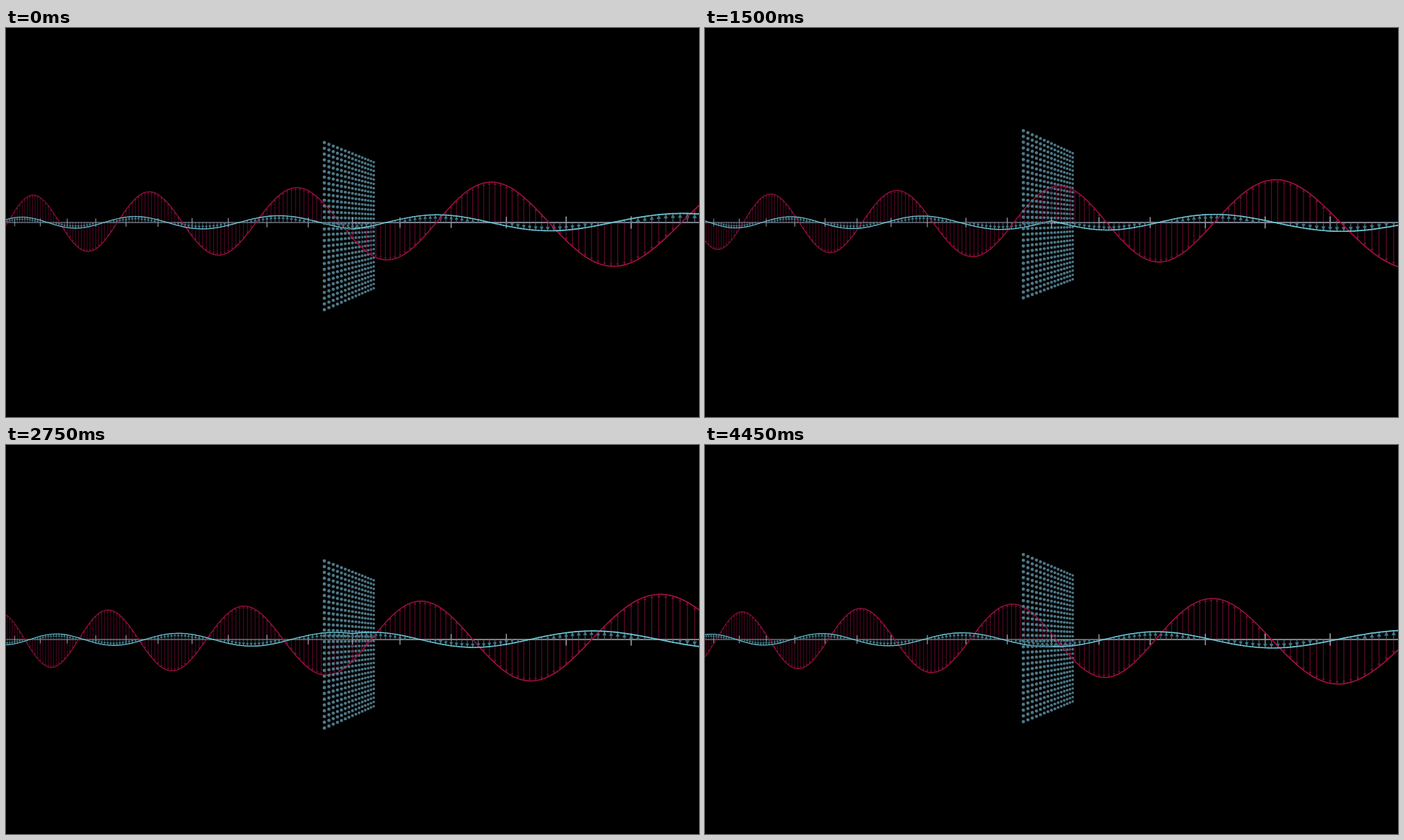
Recreate the animation shown at these times as an HTML page with a canvas. Size 960 by 540 pixels, loop 4500 ms.

```html
<!DOCTYPE html>
<html lang="en">
<head>
<meta charset="utf-8">
<title>Wave through an oscillating sheet</title>
<style>
html, body { margin: 0; width: 100%; height: 100%; overflow: hidden; background: #000; }
canvas { display: block; }
</style>
</head>
<body>
<canvas id="stage" width="960" height="540"></canvas>
<script>
const ctx = document.getElementById('stage').getContext('2d');
const LOOP = 4500, STEP = 50;
const CX = 480, CY = 270;
const FIRST = -11, LAST = 6.4;           // visible part of the axis, in units

const scaleAt = n => 1 / (1 - 0.0356 * n);
const xAt = n => CX + 63.46 * n * scaleAt(n);
const wave = u => Math.cos(u * Math.PI / 2);  // wavelength of 4 units

function line(x1, y1, x2, y2, width) {
  ctx.lineWidth = width;
  ctx.beginPath();
  ctx.moveTo(x1, y1);
  ctx.lineTo(x2, y2);
  ctx.stroke();
}

function arrows(height, color, from, to, head) {
  ctx.strokeStyle = ctx.fillStyle = color;
  for (let k = Math.round(from * 10); k < to * 10; k++) {
    const n = k / 10, s = scaleAt(n), x = xAt(n);
    const h = height(n) * s;
    const len = Math.min(Math.abs(h), head * 2 * s) * Math.sign(h);
    const half = Math.abs(len) / 2;
    line(x, CY, x, CY - h + len, 0.9 * s);
    ctx.beginPath();
    ctx.moveTo(x, CY - h);
    ctx.lineTo(x - half, CY - h + len);
    ctx.lineTo(x + half, CY - h + len);
    ctx.fill();
  }
}

function curve(height, color, from, to, width) {
  ctx.strokeStyle = color;
  const y = n => CY - height(n) * scaleAt(n), d = 0.05;
  for (let k = Math.round(from / d); k < to / d; k++) {
    const n = k * d;
    line(xAt(n), y(n), xAt(n + d), y(n + d), width * scaleAt(n));
  }
}

function axis(from, to) {
  ctx.strokeStyle = '#a9a9b8';
  for (let n = from; n < to; n++) {
    const s = scaleAt(n), x = xAt(n);
    line(x, CY, xAt(n + 1), CY, 1.25 * s);
    line(x, CY - 6.6 * s, x, CY + 6.6 * s, 1.2 * s);
  }
}

function sheet(shift) {
  for (let col = 7; col >= -7; col--) {
    const s = 1 / (1 + 0.02 * col), x = CX + 4.79 * col * s;
    for (let row = 0; row < 30; row++) {
      const y = CY + ((row - 14.5) * 6.88 - shift) * s;
      ctx.fillStyle = '#48707f';
      ctx.beginPath();
      ctx.arc(x, y, 2.05 * s, 0, 7);
      ctx.fill();
      ctx.fillStyle = '#5f8997';
      ctx.beginPath();
      ctx.arc(x - 0.4 * s, y - 0.4 * s, 0.8 * s, 0, 7);
      ctx.fill();
    }
  }
}

function draw(ms) {
  const t = ms / 1000;
  // the motion starts slightly ahead and settles to an even speed
  const crest = 2.653 + t + 0.067 * Math.max(0, 1 - t / 0.6);
  const red = n => 50.6 * wave(n - crest);
  const blue = n => 10 * wave(Math.abs(n) - crest + 1);
  const half = (from, to) => {
    arrows(red, '#6c0c31', from, to, 1.7);
    axis(from, Math.ceil(to));
    arrows(blue, '#41717f', from, to, 2.4);
    curve(red, '#a31043', from, to, 1.3);
    curve(blue, '#6cc4d3', from, to, 1.4);
  };
  ctx.fillStyle = '#000';
  ctx.fillRect(0, 0, 960, 540);
  ctx.lineCap = 'round';
  half(FIRST, 0);
  sheet(10.15 * wave(crest));
  half(0, LAST);
}

let start;
function tick(now) {
  start ??= now;
  draw(Math.floor((now - start + 1) % LOOP / STEP) * STEP);
  requestAnimationFrame(tick);
}
requestAnimationFrame(tick);
</script>
</body>
</html>
```
